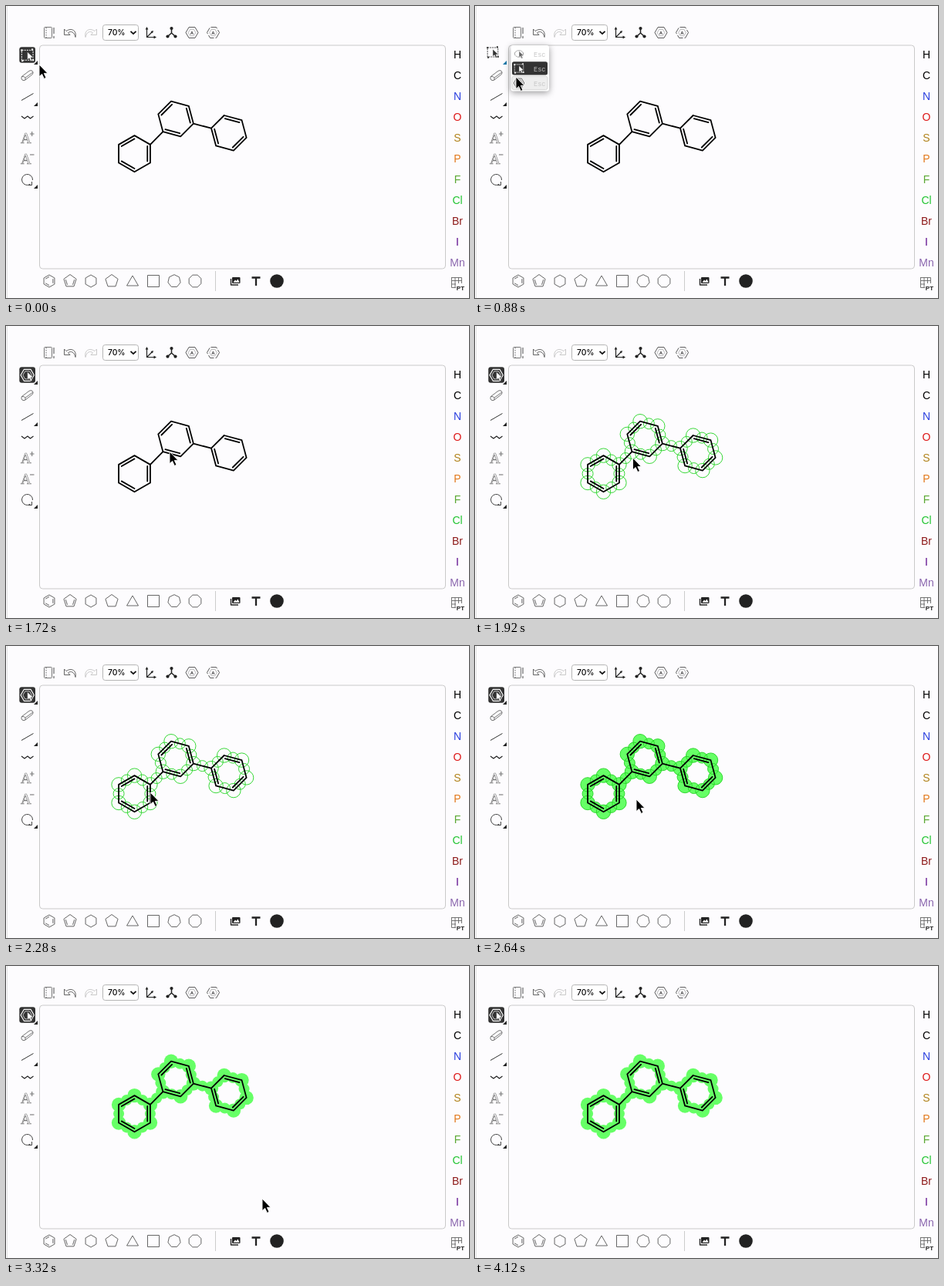
Animation of 600 by 379 pixels, one loop 4160 ms. Source, as an HTML page:

```html
<!DOCTYPE html>
<html lang="en">
<head>
<meta charset="utf-8">
<title>Molecule editor</title>
<style>
html, body { margin: 0; width: 100%; height: 100%; overflow: hidden; background: #fdfcfe; }
svg { display: block; width: 600px; height: 379px; }
text { font-family: "Liberation Sans", Arial, sans-serif; }
.ui { font-family: Inter, sans-serif; }
.serif { font-family: "Liberation Serif", serif; }
.mono { font-family: "Liberation Mono", monospace; }
</style>
</head>
<body>
<svg id="stage" viewBox="0 0 600 379" fill="none" stroke-linejoin="round"></svg>
<script>
const LOOP = 4160, STEP = 40;
const INK = '#333', GREEN = '#66ff66';
const stage = document.getElementById('stage');

const path = (d, stroke = INK, width = 1, extra = '') =>
  `<path d="${d}" stroke="${stroke}" stroke-width="${width}" ${extra}/>`;
const solid = (d, fill = INK) => `<path d="${d}" fill="${fill}"/>`;
const box = (x, y, w, h, r, extra) =>
  `<rect x="${x}" y="${y}" width="${w}" height="${h}" rx="${r}" ${extra}/>`;
const dot = (x, y, r, extra) => `<circle cx="${x}" cy="${y}" r="${r}" ${extra}/>`;
const label = (s, x, y, size, fill, extra = '') =>
  `<text x="${x}" y="${y}" font-size="${size}" fill="${fill}" ${extra}>${s}</text>`;
const group = (id, body, extra = '') => `<g id="${id}" ${extra}>${body}</g>`;
const at = (x, y, body, scale = 1) => `<g transform="translate(${x} ${y}) scale(${scale})">${body}</g>`;

const corners = (cx, cy, r, n, start = -90) => Array.from({ length: n }, (_, i) => {
  const a = (start + i * 360 / n) * Math.PI / 180;
  return [cx + r * Math.cos(a), cy + r * Math.sin(a)];
});
const line = pts => 'M' + pts.map(p => p.map(v => v.toFixed(2)).join(' ')).join('L');
const shape = (...args) => line(corners(...args)) + 'Z';
const mix = (a, b, k) => a.map((v, i) => v + (b[i] - v) * k);

// Every second edge of a ring, drawn inside it from edge `first`
function innerEdges(pts, center, first, inset) {
  let d = '';
  for (let i = first; i < pts.length; i += 2)
    d += line([pts[i], pts[(i + 1) % pts.length]].map(p => mix(p, center, inset)));
  return d;
}

// Molecule: three rings, each with its start angle and first double bond
const rings = [
  { c: [166.5, 191.7], start: -90, first: 1 },
  { c: [220.1, 146.5], start: -105, first: 1 },
  { c: [288.8, 164.8], start: -105, first: 0 }
];
for (const ring of rings) ring.pts = corners(...ring.c, 23.6, 6, ring.start);
const atoms = rings.flatMap(r => r.pts);
const bonds = rings.flatMap(r => r.pts.map((p, i) => [p, r.pts[(i + 1) % 6]]));
bonds.push([rings[0].pts[1], rings[1].pts[4]], [rings[1].pts[2], rings[2].pts[5]]);

const molecule = path(
  bonds.map(line).join('') + rings.map(r => innerEdges(r.pts, r.c, r.first, .18)).join(''),
  '#000', 1.8, 'stroke-linecap="round"');
const halo = atoms.map(p => dot(...p, 9.2, '')).join('') +
  bonds.map(([a, b]) => dot(...mix(a, b, .5), 7, '')).join('');

const arrow = (fill, edge) =>
  `<path d="M0 0V9.6L2.3 7.6L4 11.4L5.8 10.6L4.1 6.9H7.2Z" fill="${fill}" stroke="${edge}" stroke-width=".5"/>`;
function picker(kind, color, back) {
  const frames = {
    lasso: `<ellipse rx="6.5" ry="5" stroke="${color}" stroke-dasharray="2 1"/>`,
    rect: box(-6.8, -6, 13.6, 12, 0, `stroke="${color}" stroke-width=".9" stroke-dasharray="2 1"`) +
      corners(0, 0, 9, 4, 41).map(([x, y]) => box(x - 1, y - 1, 2, 2, 0, `fill="${color}"`)).join(''),
    hex: path(shape(0, 0, 8, 6, 0), color, 1.1) + path(shape(0, 0, 5.4, 6, 0), color, .7)
  };
  return frames[kind] + at(0, -4, arrow(color, back));
}
const corner = (y, fill = '#222') => solid(`M41 ${y - 5}V${y}H36Z`, fill);
const tile = kind => box(17.3, 53.3, 20.7, 20.5, 3, `fill="${INK}"`) +
  at(27.7, 63.8, picker(kind, '#fff', INK), 1.08) + corner(76);

function topBar() {
  const undo = 'M-7.5 -5V2.5H0L-2.6 -.2C1 -3 5.5 -1.5 7 5.5C9 -3 2 -7.5 -5 -2.4Z';
  const hexA = (x, dash) => path(shape(x, 34.5, 8, 6, 0), '#444', .9, dash) +
    path(shape(x, 34.5, 4.8, 6, 0), '#888', .6) +
    label('A', x, 36.7, 6, INK, 'text-anchor="middle" font-weight="bold"');
  return box(49.5, 27.5, 10, 14, 1, 'stroke="#666" stroke-width=".9"') +
    path('M52 28V42', '#666', 1, 'stroke-dasharray="1.5 1.5"') +
    path('M62 28V36M62 39V42', '#666', 1.2) +
    at(83, 35, path(undo, '#555', .9)) +
    `<g transform="translate(110 35) scale(-1 1)">${path(undo, '#c4c4c4', .9)}</g>` +
    box(125.5, 24.5, 46, 20, 3, 'fill="#fff" stroke="#b5b5b5"') +
    label('70%', 132, 38.3, 10.3, '#000', 'class="ui" font-weight="500"') +
    path('M161.5 32.8L165 36.2L168.5 32.8', '#111', 1.8) +
    path('M182.5 29V40.5H193M182.5 40.5L189 34', '#222', 1.2) +
    solid('M182.5 27L180.6 30.5H184.4ZM195 40.5L191.5 38.6V42.4ZM191 32L187.5 33L190 35.5Z', '#222') +
    path('M214.5 29V35L209.5 39.5M214.5 35L219.5 39.5', '#222', 1.5) +
    [[214.5, 29], [209.5, 39.5], [219.5, 39.5]].map(p => dot(...p, 2.1, 'fill="#222"')).join('') +
    hexA(241, '') + hexA(268.5, 'stroke-dasharray="9 2"');
}

function leftBar() {
  const outlined = 'fill="#fdfcfe" stroke="#777" stroke-width=".7"';
  const bigA = (y, sign) => `<text x="19" y="${y + 6.5}" font-size="19" class="serif" ${outlined}>A</text>` +
    path(`M31 ${y - 5}H36.5` + (sign ? `M33.7 ${y - 8}V${y - 2}` : ''), '#777', 1.1);
  return path('M20.5 91.5L30 84.3Q32 83 34 84.2Q36 86 34.5 88.5L25 96Q23 97.5 21 96Q19 94 20.5 91.5Q23.5 91 25 93.2L34.8 86M25 93.2V96', '#666', .9) +
    path('M20 122.5L35.5 113.5', '#333', 1) + corner(130) +
    path('M20 143L24 146L28 143L31.5 146L35.5 143', '#222', 1.2) +
    bigA(171, true) + bigA(198, false) +
    path('M31.5 231.2A7 7 0 1 1 34.5 226', '#444') + path('M29 232.5H33.5V228', '#444') + corner(237);
}

function rightBar() {
  const elements = 'H #000,C #000,N #2a3fe0,O #dd1616,S #b0821a,P #e2781a,F #5aa832,Cl #20c430,Br #8e1a1a,I #5c0a8c,Mn #8a66ae';
  return elements.split(',').map((e, i) => {
    const [name, color] = e.split(' ');
    return label(name, 585, 68 + i * 27, 14, color, 'text-anchor="middle"');
  }).join('') +
    path('M577.5 352V365.5H583M577.5 352.5H590.5V360M577.5 356.5H590.5M577.5 361H583M582 352.5V365M586.5 352.5V360', '#666', .9) +
    label('PT', 583.8, 368.5, 8, '#222', 'font-weight="bold"');
}

function bottomBar() {
  const y = 357, gray = '#555';
  const outlines = [[56, 6, 8], [83, 5, 8.5], [110, 6, 8], [137, 5, 8.5], [218, 7, 8.3], [245, 8, 8.5, -67.5]];
  return outlines.map(([x, n, r, a]) => path(shape(x, y, r, n, a), gray, .9)).join('') +
    path(innerEdges(corners(56, y, 8, 6), [56, y], 1, .3), gray, .9) +
    path(innerEdges(corners(83, y, 8.5, 5).slice(1), [83, y], 0, .3), gray, .9) +
    path('M164 350L171.5 363H156.5Z', gray, .9) +
    box(183.5, 349.5, 15, 15, 0, `stroke="${gray}" stroke-width=".9"`) +
    path('M271.5 344V370', '#ccc') +
    box(293, 352, 10.5, 8, 1, 'fill="#222"') + path('M291.5 354V362H301', '#222', 1.4) +
    solid('M294.5 358.8L297 355.5L298.5 357L300.5 354.5L302.5 358.8Z', '#fff') +
    path('M318.5 352.5H329.5M324 352.5V363', '#222', 2.3) +
    dot(351, y, 8.8, 'fill="#222"');
}

function menu() {
  const rows = ['lasso', 'rect', 'hex'].map((kind, i) => {
    const y = 62 + i * 19, on = i === 1;
    const back = ['#fff', INK, '#eee'][i];
    return box(48, y - 8.8, 46, 17.4, 2.5, `fill="${back}"` + (i === 2 ? ' stroke="#d0d0d0" stroke-width=".8"' : '')) +
      at(57, y, picker(kind, on ? '#fff' : '#666', back), .85) +
      label('Esc', 76, y + 3.5, 8.6, on ? '#bbb' : '#c8c8c8', 'class="mono"');
  }).join('');
  return box(46.5, 51, 49.5, 59.5, 3, 'fill="#fff" style="filter:drop-shadow(0 2px 4px #0006)"') + rows;
}

stage.innerHTML =
  path('M1.5 0V379', '#e2e2e2') +
  box(43.5, 51, 526, 290, 4, 'stroke="#c9c9c9"') +
  topBar() + leftBar() + rightBar() + bottomBar() +
  group('fill', halo, `fill="${GREEN}"`) +
  group('outline', halo, 'stroke="#22d422" stroke-width=".9"') +
  molecule +
  group('rectTool', tile('rect')) +
  group('hexTool', tile('hex')) +
  group('idleTool', at(23, 60, picker('rect', INK, '#fff')) + corner(76, '#1677a8')) +
  group('menu', menu()) +
  group('cursor', '<path d="M0 0V15.6L3.6 12.4L6.4 18.4L9 17.2L6.3 11.4H11Z" fill="#000" stroke="#fff" stroke-width=".9"/>');

const part = Object.fromEntries([...stage.querySelectorAll('[id]')].map(e => [e.id, e]));
const show = (id, on) => part[id].setAttribute('display', on ? 'inline' : 'none');

// Pointer stops: time, x, y
const stops = [
  [0, 43, 76], [120, 43, 76], [200, 37, 73], [600, 37, 73], [880, 53, 92], [1080, 60, 100],
  [1200, 60, 100], [1680, 212, 163], [1760, 212, 163], [2200, 187, 190], [2400, 187, 190],
  [2640, 209, 199], [2800, 214, 204], [3320, 332, 302], [3440, 336, 306]
];
function pointer(t) {
  const i = stops.findIndex(s => s[0] > t);
  if (i < 0) return stops[stops.length - 1].slice(1);
  const [a, b] = [stops[i - 1], stops[i]];
  const k = (t - a[0]) / (b[0] - a[0]);
  return mix(a.slice(1), b.slice(1), k * k * (3 - 2 * k));
}

function render(ms) {
  const t = Math.floor(ms % LOOP / STEP) * STEP;
  const open = t >= 600 && t < 1200;
  show('rectTool', t < 600);
  show('idleTool', open);
  show('menu', open);
  show('hexTool', t >= 1200);
  show('outline', t >= 1800 && t < 2880);
  show('fill', t >= 2400);
  show('cursor', t < 3480);
  part.cursor.setAttribute('transform', `translate(${pointer(t).map(v => v.toFixed(1)).join(' ')})`);
}

const begin = performance.now();
function tick() {
  render(performance.now() - begin);
  requestAnimationFrame(tick);
}
tick();
</script>
</body>
</html>
```
